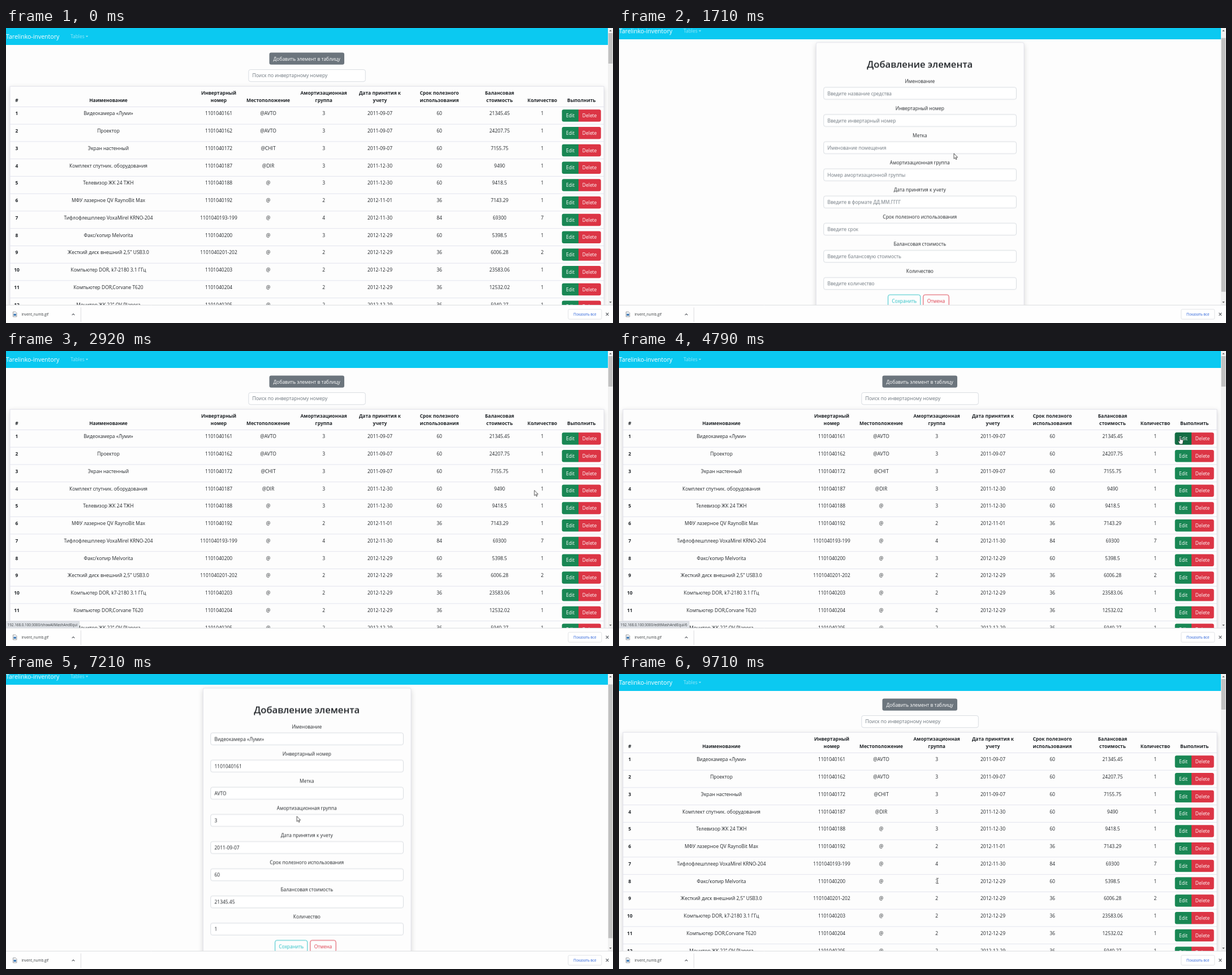
Write an HTML page that moves like this. It is 1073 px wide and 522 px high and loops after 9750 ms.

```html
<!DOCTYPE html>
<html lang="ru">
<head>
<meta charset="utf-8">
<title>Inventory</title>
<style>
  html, body { margin: 0; width: 100%; height: 100%; overflow: hidden; background: #fdfdfd; }
  svg { display: block; width: 1073px; height: 522px; }
  text { font: 8.45px "Open Sans", "Noto Sans", sans-serif; fill: #212529; white-space: pre; }
  .mid { text-anchor: middle; }
  .bold { font-weight: 700; }
  .white { fill: #fff; }
  .hint { fill: #6c757d; }
  .brand { font-size: 10.56px; fill: #fff; }
  .faded { fill: #fff; fill-opacity: .55; }
  .title { font-size: 16.6px; font-weight: 600; }
  .small { font-size: 6.35px; fill: #3c4043; }
  .link { fill: #2b62d9; }
  .save { fill: #22bfc4; }
  .cancel { fill: #dc3545; }
  .box { fill: #fff; stroke: #ced4da; stroke-width: .8; }
  .card { fill: #fdfdfd; stroke: #dcdce6; stroke-width: .8; filter: drop-shadow(0 3px 4px rgba(0, 0, 0, .16)); }
  .rule { stroke: #dcdeea; stroke-width: .8; }
</style>
</head>
<body>
<svg viewBox="0 0 1073 522" id="stage"></svg>
<script>
const LOOP = 9750;

const text = (str, x, y, cls = "") => `<text x="${x}" y="${y}" class="${cls}">${str}</text>`;
const rect = (x, y, w, h, attrs = "") => `<rect x="${x}" y="${y}" width="${w}" height="${h}" ${attrs}/>`;
const path = (d, attrs) => `<path d="${d}" ${attrs}/>`;
const group = (id, ...parts) => `<g id="${id}">${parts.flat().join("")}</g>`;

const columns = [
  [19, "#"], [181, "Наименование"], [376, "Инвертарный", "номер"], [463.5, "Местоположение"],
  [561.7, "Амортизационная", "группа"], [661, "Дата принятия к", "учету"],
  [766, "Срок полезного", "использования"], [872.5, "Балансовая", "стоимость"],
  [948, "Количество"], [1017.3, "Выполнить"]
];

const rows = `Видеокамера «Луми»|1101040161|@AVTO|3|2011-09-07|60|21345.45|1
Проектор|1101040162|@AVTO|3|2011-09-07|60|24207.75|1
Экран настенный|1101040172|@CHIT|3|2011-09-07|60|7155.75|1
Комплект спутник. оборудования|1101040187|@DIR|3|2011-12-30|60|9490|1
Телевизор ЖК 24 ТЖН|1101040188|@|3|2011-12-30|60|9418.5|1
МФУ лазерное QV RaynoBit Max|1101040192|@|2|2012-11-01|36|7143.29|1
Тифлофлешплеер VoxaMirel KRNO-204|1101040193-199|@|4|2012-11-30|84|69300|7
Факс/копир Melvorita|1101040200|@|3|2012-12-29|60|5398.5|1
Жесткий диск внешний 2,5" USB3.0|1101040201-202|@|2|2012-12-29|36|6006.28|2
Компьютер DOR, k7-2180 3.1 ГГц|1101040203|@|2|2012-12-29|36|23583.06|1
Компьютер DOR,Corvane T620|1101040204|@|2|2012-12-29|36|12532.02|1
Монитор ЖК 22" QV Planora|1101040205|@|2|2012-12-29|36|5940.27|1`
  .split("\n").map(line => line.split("|"));

const fields = [
  ["Именование", "Введите название средства", "Видеокамера «Луми»"],
  ["Инвертарный номер", "Введите инвертарный номер", "1101040161"],
  ["Метка", "Именование помещения", "AVTO"],
  ["Амортизационная группа", "Номер амортизационной группы", "3"],
  ["Дата принятия к учету", "Введите в формате ДД.ММ.ГГГГ", "2011-09-07"],
  ["Срок полезного использования", "Введите срок", "60"],
  ["Балансовая стоимость", "Введите балансовую стоимость", "21345.45"],
  ["Количество", "Введите количество", "1"]
];

const header = ([x, first, second]) => second
  ? text(first, x, 118, "mid bold") + text(second, x, 131.3, "mid bold")
  : text(first, x, 131.3, "mid bold");

const editShape = "h-26 a3.3 3.3 0 0 0 -3.3 3.3 v14.9 a3.3 3.3 0 0 0 3.3 3.3 h26z";
const deleteShape = "h36.4 a3.3 3.3 0 0 1 3.3 3.3 v14.9 a3.3 3.3 0 0 1 -3.3 3.3 h-36.4z";

function tableRow(cells, i) {
  const y = 154.4 + i * 30.75, top = y - 10.2;
  return path(`M7 ${y + 15.8}H1057`, 'class="rule"') +
    text(i + 1, 19, y, "mid bold") +
    cells.map((cell, c) => text(cell, columns[c + 1][0], y, "mid")).join("") +
    path(`M1012 ${top}${editShape}`, 'fill="#198754"') +
    (i ? "" : path(`M1012 ${top}${editShape}`, 'fill="#136c43" id="editHover"')) +
    path(`M1012 ${top}${deleteShape}`, 'fill="#dc3545"') +
    text("Edit", 997.6, y + 3.8, "mid white") + text("Delete", 1031.6, y + 3.8, "mid white");
}

const fieldY = i => 125.3 + i * 48.08;
const button = (x, y, w, attrs) => rect(x, y, w, 21.2, `rx="3.3" ${attrs}`);

const table = group("table",
  button(465.5, 43.6, 132.5, 'fill="#6c757d"'),
  button(465.5, 43.6, 132.5, 'fill="#5c636a" id="addHover"'),
  text("Добавить элемент в таблицу", 531.7, 57.6, "mid white"),
  button(428.9, 73.6, 206.4, 'class="box"'),
  text("Поиск по инвертарному номеру", 435.6, 87.4, "hint"),
  rect(7, 103.2, 1050, 420, 'class="card"'),
  columns.map(header),
  path("M7 139.5H1057", 'class="rule"'),
  rows.map(tableRow));

const form = group("form",
  rect(348.4, 35.4, 367.6, 480.6, 'rx="3" class="card"'),
  text("Добавление элемента", 531.8, 79.8, "mid title"),
  fields.map(([label], i) =>
    text(label, 531.8, fieldY(i) - 18.4, "mid") + button(361.8, fieldY(i) - 10.6, 340.6, 'class="box"')),
  group("hints", fields.map((f, i) => text(f[1], 368.5, fieldY(i) + 3.2, "hint"))),
  group("values", fields.map((f, i) => text(f[2], 368.5, fieldY(i) + 3.2))),
  button(475.6, 481.8, 57.2, 'fill="none" stroke="#22bfc4" stroke-width=".9"'),
  text("Сохранить", 504.3, 495.6, "mid save"),
  button(537.8, 481.8, 45.4, 'fill="none" stroke="#dc3545" stroke-width=".9"'),
  text("Отмена", 560.5, 495.6, "mid cancel"),
  group("cancelHover", button(537.4, 481.4, 46.2, 'fill="#dc3545"'), text("Отмена", 560.5, 495.6, "mid white")));

const nav = rect(0, 0, 1064, 30, 'fill="#0bc9f1"') +
  text("Tarelinko-inventory", 0, 19, "brand") + text("Tables", 114, 18, "faded") +
  path("M140.8 13.8h4.6l-2.3 2.4z", 'class="faded"');

const scrollbar = rect(1064, 0, 9, 490, 'fill="#f1f1f1"') +
  rect(1064.7, 9, 7.6, 54, 'fill="#c1c1c1" id="shortThumb"') +
  rect(1064.7, 9, 7.6, 449, 'fill="#c1c1c1" id="longThumb"') +
  path("M1066.3 5.8h4.4l-2.2-2.4zM1066.3 484.2h4.4l-2.2 2.4z", 'fill="#505050"');

const statusBar = (id, width, url) =>
  group(id, rect(-1, 478.6, width + 1, 12, 'fill="#dee1e6" stroke="#c4c7cc" stroke-width=".5"'),
    text("192.168.0.100:3000/" + url, 2.6, 487, "small"));

const downloads = rect(0, 490, 1073, 32, 'fill="#fefefe"') +
  path("M0 490.4H1073M132.4 494.5V520", 'stroke="#d5d7da" stroke-width=".8"') +
  path("M12.5 502.3h4.4l2 2v6.6h-6.4z", 'fill="#fff" stroke="#6b7078" stroke-width=".7"') +
  rect(13.6, 505.6, 4.2, 3.6, 'fill="#3a78b5"') +
  text("invent_numb.gif", 27.5, 509.4, "small") +
  path("M116.6 508.2l2.4-2.4 2.4 2.4M1060.5 504l4.8 4.8m0-4.8l-4.8 4.8", 'fill="none" stroke="#5f6368" stroke-width="1.1"') +
  rect(993.8, 497.8, 59, 17.4, 'rx="2" fill="#fff" stroke="#dadce0" stroke-width=".8"') +
  text("Показать все", 1023.3, 508.6, "small mid link");

const ink = 'fill="#fff" stroke="#111" stroke-width=".7" stroke-linejoin="round"';
const cursor = group("cursor",
  group("arrow", path("M0 0V9.4L2.2 7.4 3.6 10.7 5.1 10 3.7 6.9H6.6z", ink)),
  group("hand", path("M-.9 6.6V.9a.9.9 0 0 1 1.8 0V4l3.6.7q1 .3 .9 1.4l-.5 4-.6 2.2H-.7L-3.2 8q-.7-1.2 .5-1.5 1 0 1.8 1.2z", ink)),
  group("beam",
    path("M-2-4.6H2M0-4.6V4.6M-2 4.6H2", 'fill="none" stroke="#fff" stroke-width="1.6"'),
    path("M-2-4.6H-.4L0-4.2.4-4.6H2M0-4.2V4.2M-2 4.6H-.4L0 4.2.4 4.6H2", 'fill="none" stroke="#222" stroke-width=".7"')));

stage.innerHTML = rect(0, 0, 1073, 522, 'fill="#fdfdfd"') +
  group("page", table, form, nav) + scrollbar +
  statusBar("listUrl", 129.5, "showAllMashAndEqui") + statusBar("editUrl", 124, "editMashAndEqui/6") +
  downloads + cursor;

// Timeline: all times in ms
const sheet = document.head.appendChild(document.createElement("style"));
const rules = [];

function animate(id, prop, keys, easing) {
  const frames = keys.map(([ms, value]) => `${(ms / LOOP * 100).toFixed(4)}%{${prop}:${value}}`).join("");
  rules.push(`@keyframes ${id}-${prop}{${frames}}`,
    `#${id}{animation:${id}-${prop} ${LOOP}ms ${easing} infinite}`);
}

const show = (id, ...spans) =>
  animate(id, "opacity", [[0, 0], ...spans.flatMap(([on, off]) => [[on, 1], [off, 0]])], "step-end");
const move = (id, points) =>
  animate(id, "transform", points.map(([ms, x, y]) => [ms, `translate(${x}px,${y}px)`]), "linear");
const scroll = (id, distance) => move(id, [
  [0, 0, 0], [1640, 0, 0], [1830, 0, distance], [2849, 0, distance], [2850, 0, 0],
  [7130, 0, 0], [7330, 0, distance], [8549, 0, distance], [8550, 0, 0], [LOOP, 0, 0]]);

const formSpans = [[720, 2850], [5300, 8550]];
const tableSpans = [[0, 720], [2850, 5300], [8550, LOOP]];
show("form", ...formSpans);
show("longThumb", ...formSpans);
show("table", ...tableSpans);
show("shortThumb", ...tableSpans);
show("hints", formSpans[0]);
show("values", formSpans[1]);
show("addHover", [420, 720]);
show("editHover", [4450, 5300]);
show("cancelHover", [2350, 2850], [8000, 8550]);
show("listUrl", [2450, 3050], [8100, 8640]);
show("editUrl", [4550, 5400]);
show("arrow", [40, 250], [800, 2350], [2720, 4450], [5350, 6250], [6700, 8000], [8300, 9210]);
show("hand", [250, 800], [2350, 2720], [4450, 5350], [8000, 8300]);
show("beam", [6250, 6700], [9210, LOOP]);

scroll("page", -26);
rules.push("#longThumb{animation-name:longThumb-opacity,longThumb-transform}");
const thumbRule = rules.pop();
const fade = rules.find(rule => rule.startsWith("#longThumb{"));
scroll("longThumb", 23.3);
rules.push(fade.replace("step-end infinite", `step-end infinite,longThumb-transform ${LOOP}ms linear infinite`));

move("cursor", [
  [0, 600, 530], [40, 600, 518], [250, 534, 55], [720, 534, 55], [1550, 592, 222], [1800, 592, 222],
  [2350, 558, 460], [2720, 558, 458], [2920, 934, 246.5], [3000, 934, 246.5], [3630, 965, 185],
  [4450, 992, 152.5], [5250, 992, 152.5], [6250, 429, 132], [6650, 429, 132], [7250, 520, 260],
  [8000, 557, 462], [8260, 557, 462], [8420, 551.5, 432.5], [8600, 548, 428], [9210, 540, 450],
  [9250, 563, 366], [LOOP, 563, 366]]);

sheet.textContent = rules.join("\n");
</script>
</body>
</html>
```
